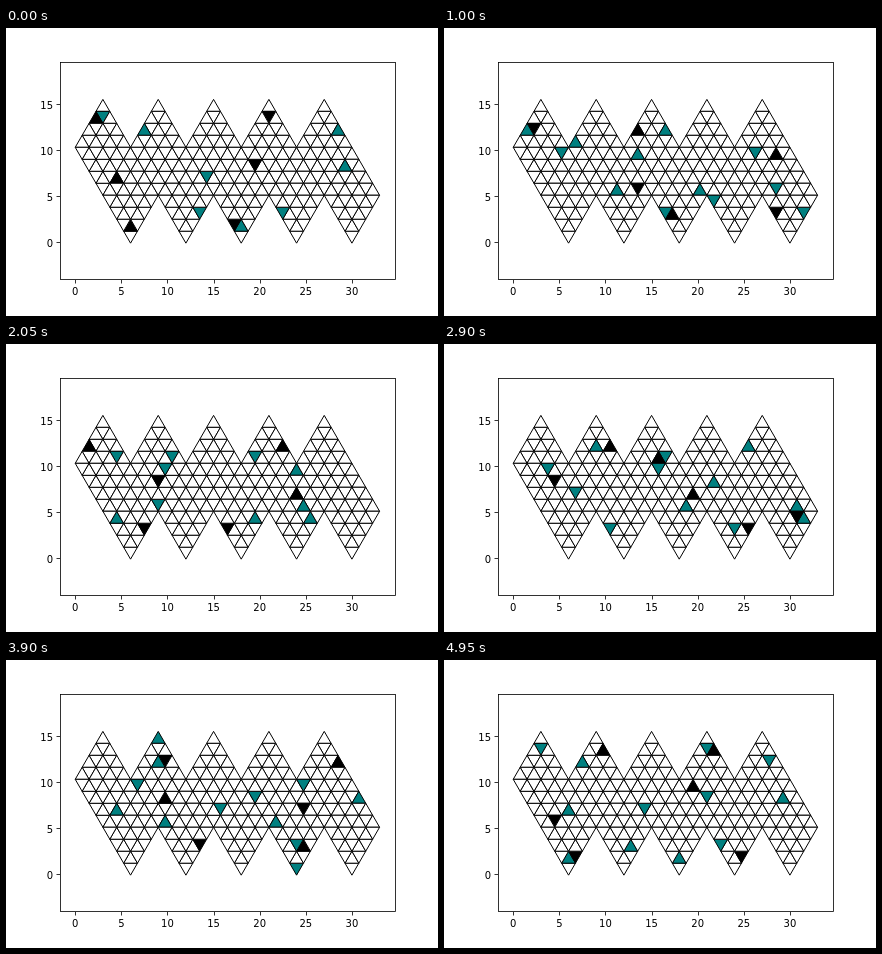
Write an HTML page that moves like this. It is 432 px wide and 288 px high and loops after 5 s.

```html
<!DOCTYPE html>
<html lang="en">
<head>
<meta charset="utf-8">
<title>Points on an unfolded icosahedron</title>
<style>
html, body { margin: 0; width: 100%; height: 100%; overflow: hidden; background: #fff; }
svg { display: block; width: 432px; height: 288px; }
text { font: 10px "DejaVu Sans", sans-serif; }
.cell { stroke: #000; stroke-width: 1; }
.axis { fill: none; stroke: #000; stroke-width: .8; }
</style>
</head>
<body>
<svg id="stage" viewBox="0 0 432 288"></svg>
<script>
const STEP = 50, LOOP = 5000, SPLIT = 4;
const COLORS = { teal: '#008080', black: '#000' };
const ROW = 0.75 * Math.sqrt(3), TOP = 12 * ROW;
const SCALE = 334.8 / 36.3;
const px = x => 54 + (x + 1.65) * SCALE;
const py = y => 143.28 - (y - TOP / 2) * SCALE;
const stage = document.getElementById('stage');

function add(tag, attrs, label) {
  const node = document.createElementNS('http://www.w3.org/2000/svg', tag);
  for (const name in attrs) node.setAttribute(name, attrs[name]);
  if (label !== undefined) node.textContent = label;
  return stage.appendChild(node);
}

// A corner holds its place on the flat net and on the sphere: [x, y, X, Y, Z].
function corner(x, level) {
  const lon = x * Math.PI / 15;
  const z = [1, 1, -1, -1][level] / (level % 3 ? Math.sqrt(5) : 1);
  const r = Math.sqrt(1 - z * z);
  return [x, TOP * (1 - level / 3), r * Math.cos(lon), r * Math.sin(lon), z];
}

const dot = (a, b) => a[0] * b[0] + a[1] * b[1] + a[2] * b[2];
const unit = v => v.map(n => n / Math.hypot(...v));
const cells = [], cellAt = {};

function addCell(points) {
  const mid = points[0].map((_, i) => (points[0][i] + points[1][i] + points[2][i]) / 3);
  const node = add('polygon', {
    class: 'cell', fill: '#fff',
    points: points.map(p => px(p[0]).toFixed(2) + ',' + py(p[1]).toFixed(2)).join(' ')
  });
  const cell = { node, dir: unit(mid.slice(2)), fill: '#fff' };
  cells.push(cell);
  cellAt[[Math.round(mid[0] / 0.75), Math.floor((TOP - mid[1]) / ROW)]] = cell;
}

function addFace(a, b, c) {
  const at = (i, j) => a.map((n, k) => n + ((b[k] - n) * i + (c[k] - n) * j) / SPLIT);
  for (let i = 0; i < SPLIT; i++) {
    for (let j = 0; i + j < SPLIT; j++) {
      addCell([at(i, j), at(i + 1, j), at(i, j + 1)]);
      if (i + j < SPLIT - 1) addCell([at(i + 1, j), at(i + 1, j + 1), at(i, j + 1)]);
    }
  }
}

for (let x = 0; x < 30; x += 6) {
  addFace(corner(x + 3, 0), corner(x, 1), corner(x + 6, 1));
  addFace(corner(x + 3, 2), corner(x, 1), corner(x + 6, 1));
  addFace(corner(x + 6, 1), corner(x + 3, 2), corner(x + 9, 2));
  addFace(corner(x + 6, 3), corner(x + 3, 2), corner(x + 9, 2));
}

// Axes
add('rect', { class: 'axis', x: 54.5, y: 34.5, width: 335, height: 217 });
for (let v = 0; v <= 30; v += 5) {
  const x = Math.round(px(v)) + 0.5;
  add('path', { class: 'axis', d: `M${x} 252v3.5` });
  add('text', { x: px(v), y: 267, 'text-anchor': 'middle' }, v);
  if (v > 15) continue;
  const y = Math.round(py(v)) - 0.5;
  add('path', { class: 'axis', d: `M54 ${y}h-3.5` });
  add('text', { x: 47, y: py(v) + 3.8, 'text-anchor': 'end' }, v);
}

// Waypoints as "column,row" on the net; every body has an antipodal twin.
const TIMES = [0, 1000, 2050, 2900, 3500, 4350, 4950];
const RESTS = [[100, 250], [1000, 1100], [2600, 2750], [3500, 3600]];
const BODIES = [
  ['teal', '4,1 2,2 2,2 34,2 34,5 34,2 37,2'],
  ['teal', '10,2 9,3 13,4 21,4 22,4 39,4 39,5'],
  ['teal', '38,2 35,4 32,4 29,5 25,5 27,4 28,5'],
  ['teal', '39,5 18,4 14,3 12,2 13,1 11,3 4,1'],
  ['teal', '28,1 22,2 26,3 22,3 20,0 4,0 28,1'],
  ['teal', '26,5 7,4 6,3 5,4 7,3 10,4 10,2'],
  ['black', '3,1 3,2 2,2 6,5 3,4 35,2 29,1'],
  ['black', '28,1 18,2 12,5 14,2 13,2 13,1 13,1'],
  ['black', '26,5 38,4 30,2 21,3 16,5 30,5 26,4']
].map(([color, way]) => ({ color, way: way.split(' ').map(id => cellAt[id].dir) }));

function nearest(dir) {
  return cells.reduce((best, cell) => dot(cell.dir, dir) > dot(best.dir, dir) ? cell : best);
}

function position(way, t) {
  let i = TIMES.length - 1;
  while (TIMES[i] > t) i--;
  if (i === TIMES.length - 1) return way[i];
  const part = (t - TIMES[i]) / (TIMES[i + 1] - TIMES[i]);
  const from = way[i], sign = dot(from, way[i + 1]) < 0 ? -1 : 1;
  const angle = Math.acos(Math.min(1, sign * dot(from, way[i + 1])));
  if (angle < 1e-6) return from;
  const a = Math.sin((1 - part) * angle), b = sign * Math.sin(part * angle);
  return unit(from.map((n, k) => a * n + b * way[i + 1][k]));
}

function draw(time) {
  const rest = RESTS.find(([start, end]) => time >= start && time < end);
  const t = rest ? rest[0] : time;
  const fills = new Map();
  for (const { color, way } of BODIES) {
    const dir = position(way, t);
    fills.set(nearest(dir), COLORS[color]);
    fills.set(nearest(dir.map(n => -n)), COLORS[color]);
  }
  for (const cell of cells) {
    const fill = fills.get(cell) || '#fff';
    if (fill !== cell.fill) cell.node.setAttribute('fill', cell.fill = fill);
  }
}

const began = performance.now();
let shown = -1;
function tick() {
  const elapsed = Math.max(0, performance.now() - began) % LOOP;
  const time = Math.floor(elapsed / STEP) * STEP;
  if (time !== shown) draw(shown = time);
  requestAnimationFrame(tick);
}
tick();
</script>
</body>
</html>
```
